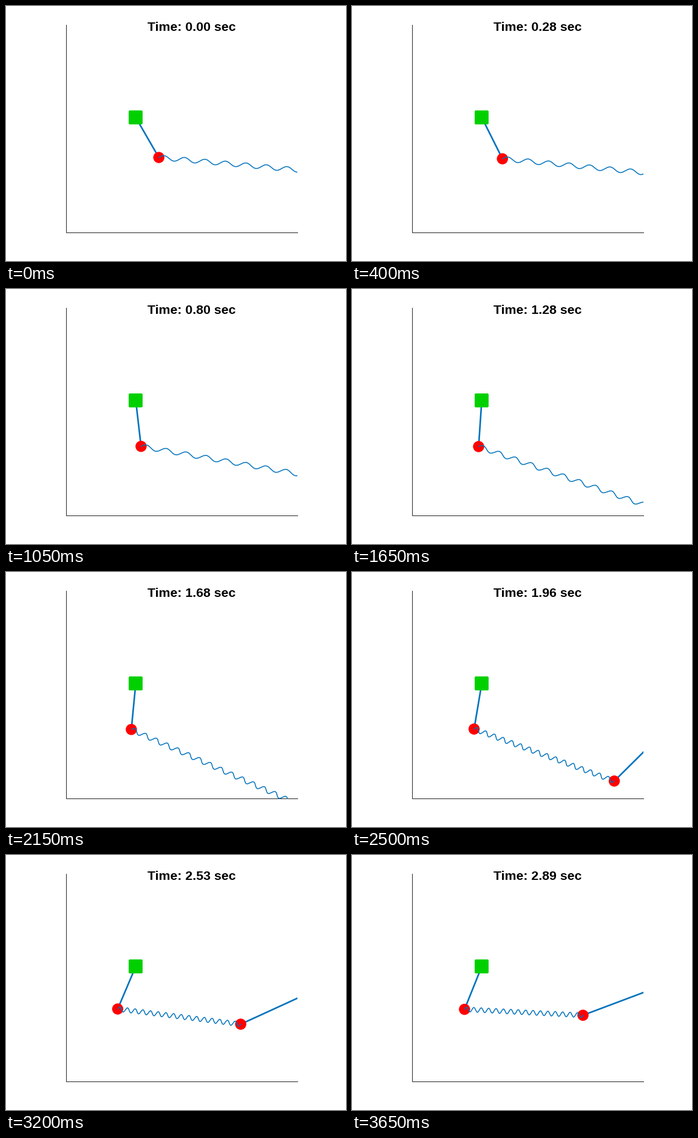
Write a matplotlib script that moves like this. It is 560x420 px and loops after 3700 ms.

```python
import numpy as np
import matplotlib.pyplot as plt
from matplotlib.animation import FuncAnimation
from matplotlib.patches import Circle, FancyBboxPatch, Rectangle

W, H, DPI = 560, 420, 100
PX = 72 / DPI                      # one pixel in points
FRAMES, INTERVAL = 74, 50
DT = 20 / 499                      # simulated seconds per step

LEFT, RIGHT, TOP, BOTTOM = 99.6, 480.2, 31.5, 373.8
UNIT = 76.07                       # pixels per metre
PIVOT1 = np.array([LEFT + 1.5 * UNIT, BOTTOM - 2.5 * UNIT])
PIVOT2 = PIVOT1 + [5 * UNIT, 0]
LEN1, LEN2 = UNIT, 3 * UNIT
COILS, AMP = 16, 3.8

BLUE, RED, GREEN = "#0072bd", "#ff0000", "#00d000"


def spline(steps, values, v0, v1):
    """Clamped cubic spline through (steps * DT, values)."""
    t, y = np.array(steps) * DT, np.array(values, float)
    h, n = np.diff(t), len(t)
    d = np.diff(y) / h
    a, b = np.eye(n), np.zeros(n)
    b[0], b[-1] = v0, v1
    for i in range(1, n - 1):
        a[i, i - 1:i + 2] = 1 / h[i - 1], 2 / h[i - 1] + 2 / h[i], 1 / h[i]
        b[i] = 3 * (d[i - 1] / h[i - 1] + d[i] / h[i])
    m = np.linalg.solve(a, b)

    def at(x):
        i = min(max(np.searchsorted(t, x, side="right") - 1, 0), n - 2)
        s = (x - t[i]) / h[i]
        return (y[i] * (1 + 2 * s) * (1 - s) ** 2
                + y[i + 1] * s * s * (3 - 2 * s)
                + h[i] * s * (1 - s) * (m[i] * (1 - s) - m[i + 1] * s))

    return at


# swing angles in degrees from the vertical
angle1 = spline([0, 7, 20, 32, 42, 55, 66, 72],
                [30, 26.6, 6.6, -3.9, -5.5, -15.3, -24.2, -21.9], 0, 19)
angle2 = spline([0, 7, 20, 32, 42, 45, 55, 66, 72],
                [60, 58.1, 42.7, 9.6, -26.9, -35.8, -55.7, -67.6, -69.4],
                0, -1.5)


def bob_at(pivot, length, degrees):
    q = np.radians(degrees)
    return pivot + length * np.array([np.sin(q), np.cos(q)])


def coil(p, q):
    s = np.linspace(0, 1, COILS * 20 + 1)
    along = q - p
    ux, uy = along / np.hypot(*along)
    wave = AMP * np.sin(2 * np.pi * COILS * s)
    return p[0] + along[0] * s + uy * wave, p[1] + along[1] * s - ux * wave


fig = plt.figure(figsize=(W / DPI, H / DPI), dpi=DPI, facecolor="white")
ax = fig.add_axes([0, 0, 1, 1])
ax.set(xlim=(0, W), ylim=(H, 0))
ax.axis("off")

ax.plot([99.5, 99.5, 481], [31, 373.5, 373.5], color="#262626", lw=PX,
        snap=False, solid_capstyle="butt", solid_joinstyle="miter", zorder=1)

view = Rectangle((LEFT, TOP), RIGHT - LEFT, BOTTOM - TOP,
                 transform=ax.transData)


def clipped_line(width, z):
    line, = ax.plot([], [], color=BLUE, lw=width * PX, zorder=z)
    line.set_clip_path(view)
    return line


rod1, rod2 = clipped_line(2.6, 2), clipped_line(2.6, 2)
spring = clipped_line(1.5, 5)
bob1, bob2 = (ax.add_patch(Circle((0, 0), 9.2, fc=RED, lw=0, zorder=3))
              for _ in range(2))
ax.add_patch(FancyBboxPatch((204, 174), 19, 19, fc=GREEN, lw=0, zorder=4,
                            boxstyle="round,pad=2,rounding_size=2"))
label = ax.text(LEFT + 1.75 * UNIT, 41, "", fontsize=21.33 * PX,
                family="Liberation Sans", weight="bold", color="black",
                ha="left", va="baseline", zorder=6)


def draw(i):
    t = max(i - 1, 0) * DT         # the first pose is held for two ticks
    p = bob_at(PIVOT1, LEN1, angle1(t))
    q = bob_at(PIVOT2, LEN2, angle2(t))
    rod1.set_data(*zip(PIVOT1, p))
    rod2.set_data(*zip(PIVOT2, q))
    spring.set_data(*coil(p, q))
    bob1.center, bob2.center = p, q
    bob2.set_visible(bool(q[0] < RIGHT and q[1] < BOTTOM))
    label.set_text(f"Time: {t:.2f} sec")
    return rod1, rod2, spring, bob1, bob2, label


anim = FuncAnimation(fig, draw, frames=FRAMES, interval=INTERVAL,
                     repeat=True, repeat_delay=0, blit=False)
plt.show()
```
